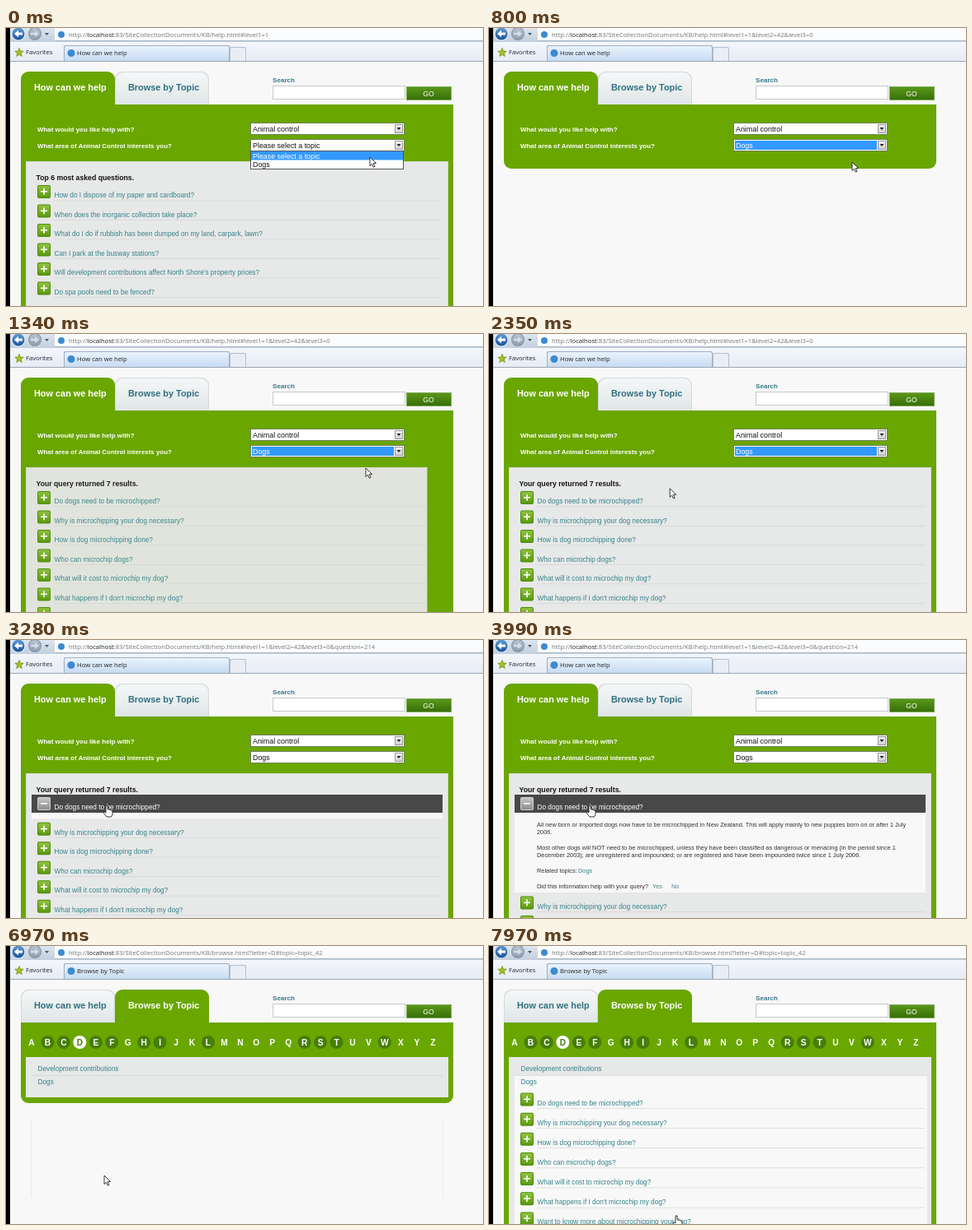
These frames come from a looping animation (578 px wide and 338 px high, 8000 ms). An HTML page with a canvas:

```html
<!DOCTYPE html>
<html lang="en">
<head>
<meta charset="utf-8">
<title>Help page walkthrough</title>
<style>
  html, body { margin: 0; width: 100%; height: 100%; overflow: hidden; background: #f8f8f8; }
  canvas { display: block; width: 578px; height: 338px; }
</style>
</head>
<body>
<canvas id="stage" width="578" height="338"></canvas>
<script>
const ctx = document.getElementById('stage').getContext('2d');
const LOOP = 8000;
const ARIAL = '"Liberation Sans", Arial, sans-serif';
const CHROME = '"Open Sans", "Noto Sans", sans-serif';
const GREEN = '#6aa600', TEAL = '#35838a', GREY = '#e7e8e8';

const TIME = { pick: 230, choose: 420, ask: 3060, browse: 5720, letter: 6320, topic: 6720 };

const POPULAR = [
  'How do I dispose of my paper and cardboard?',
  'When does the inorganic collection take place?',
  'What do I do if rubbish has been dumped on my land, carpark, lawn?',
  'Can I park at the busway stations?',
  "Will development contributions affect North Shore's property prices?",
  'Do spa pools need to be fenced?'
];
const DOG_QUESTIONS = [
  'Do dogs need to be microchipped?',
  'Why is microchipping your dog necessary?',
  'How is dog microchipping done?',
  'Who can microchip dogs?',
  'What will it cost to microchip my dog?',
  "What happens if I don't microchip my dog?",
  'Want to know more about microchipping your dog?'
];
const ANSWER = [
  [227, 'All new born or imported dogs now have to be microchipped in New Zealand. This will apply mainly to new puppies born on or after 1 July'],
  [236, '2006.'],
  [255, 'Most other dogs will NOT need to be microchipped, unless they have been classified as dangerous or menacing (in the period since 1'],
  [264, 'December 2003); are unregistered and impounded; or are registered and have been impounded twice since 1 July 2006.'],
  [283, 'Related topics:'],
  [302, 'Did this information help with your query?']
];

// Pointer path: time, x, y
const POINTER = [
  [0, 441, 157], [70, 441, 157], [260, 441, 166], [420, 441, 165], [800, 440, 163],
  [1340, 436, 163], [2180, 240, 185], [2800, 122, 201], [4430, 122, 201], [4950, 153, 282],
  [5420, 153, 282], [5660, 194, 72], [5900, 194, 72], [6270, 90, 117], [6380, 90, 117],
  [6640, 48, 164], [6740, 48, 164], [6960, 119, 279], [7080, 119, 279], [7820, 227, 328], [8000, 227, 328]
];
const HAND_TIMES = [[2450, 4480], [5630, 5960], [6230, 6430], [6600, 6770], [7400, 8000]];

const swing = p => 0.5 - Math.cos(Math.PI * p) / 2;
const progress = (t, start, length) => swing(Math.min(1, Math.max(0, (t - start) / length)));

function text(str, x, y, size, color, bold, family = ARIAL) {
  ctx.font = `${bold ? 'bold ' : ''}${size}px ${family}`;
  ctx.fillStyle = color;
  ctx.fillText(str, x, y);
  return x + ctx.measureText(str).width;
}

function centered(...args) {
  ctx.textAlign = 'center';
  text(...args);
  ctx.textAlign = 'left';
}

function rect(x, y, w, h, fill) {
  ctx.fillStyle = fill;
  ctx.fillRect(x, y, w, h);
}

function frame(x, y, w, h, color) {
  ctx.strokeStyle = color;
  ctx.lineWidth = 1;
  ctx.strokeRect(x + 0.5, y + 0.5, w - 1, h - 1);
}

function rounded(x, y, w, h, radii, fill) {
  ctx.beginPath();
  ctx.roundRect(x, y, w, h, radii);
  ctx.fillStyle = fill;
  ctx.fill();
}

function circle(x, y, r, fill) {
  ctx.beginPath();
  ctx.arc(x, y, r, 0, Math.PI * 2);
  ctx.fillStyle = fill;
  ctx.fill();
}

function shape(points, fill, stroke) {
  ctx.beginPath();
  points.forEach(([x, y]) => ctx.lineTo(x, y));
  ctx.closePath();
  ctx.fillStyle = fill;
  ctx.fill();
  if (stroke) {
    ctx.strokeStyle = stroke;
    ctx.lineWidth = 0.9;
    ctx.stroke();
  }
}

function shade(y, h, top, bottom) {
  const g = ctx.createLinearGradient(0, y, 0, y + h);
  g.addColorStop(0, top);
  g.addColorStop(1, bottom);
  return g;
}

function clipped(x, y, w, h, draw) {
  ctx.save();
  ctx.beginPath();
  ctx.rect(x, y, w, h);
  ctx.clip();
  draw();
  ctx.restore();
}

function pageAddress(t) {
  if (t >= TIME.browse) {
    return 'browse.html' + (t >= TIME.letter ? '?letter=D' : '') + (t >= TIME.topic ? '#topic=topic_42' : '');
  }
  return 'help.html#level1=1' + (t >= 570 ? '&level2=42&level3=0' : '') + (t >= TIME.ask ? '&question=214' : '');
}

function drawBrowser(t) {
  rect(0, 0, 578, 17, shade(0, 17, '#dde5ee', '#c3cfdd'));
  rect(59, 0, 519, 15, '#fbfcfd');
  rect(59, 15, 519, 1, '#a9b6c4');
  rect(0, 17, 578, 24, shade(17, 24, '#f3f6fb', '#e6ecf5'));
  rect(0, 40, 578, 1, '#9aa6b4');

  circle(15, 7, 8.5, '#e6edf5');
  circle(15, 7, 7.5, shade(0, 15, '#5e9ad3', '#154f96'));
  shape([[10, 7], [15, 2.5], [15, 5.5], [20, 5.5], [20, 8.5], [15, 8.5], [15, 11.5]], '#fff');
  circle(35, 7, 8, '#8493a5');
  circle(35, 7, 7, shade(0, 14, '#b8c4d2', '#8d9db0'));
  shape([[40, 7], [35, 3], [35, 5.7], [30, 5.7], [30, 8.3], [35, 8.3], [35, 11]], '#d5dde6');
  shape([[47, 6], [52, 6], [49.5, 9]], '#47586d');

  circle(67, 8, 4, '#3d8ad0');
  let x = text('http://', 76, 10.5, 7.7, '#777', false, CHROME);
  x = text('localhost', x, 10.5, 7.7, '#222', false, CHROME);
  text(':83/SiteCollectionDocuments/KB/' + pageAddress(t), x, 10.5, 7.7, '#777', false, CHROME);

  const star = Array.from({ length: 10 }, (_, i) => {
    const r = i % 2 ? 2.4 : 5.5, a = i * Math.PI / 5;
    return [16 + r * Math.sin(a), 30 - r * Math.cos(a)];
  });
  shape(star, '#a8bf22', '#7c9a1c');
  text('Favorites', 24, 32.3, 7.7, '#223', false, CHROME);

  rounded(70, 21, 201, 19, [2, 2, 0, 0], '#9dafc4');
  rounded(71, 22, 199, 18, [2, 2, 0, 0], shade(22, 18, '#eaf3fd', '#c7dbf1'));
  rounded(271, 23, 20, 17, [2, 2, 0, 0], '#b4c0ce');
  rounded(272, 24, 18, 16, [2, 2, 0, 0], '#e9eef6');
  circle(79, 30.5, 4.5, '#3d8ad0');
  text(t < TIME.browse ? 'How can we help' : 'Browse by Topic', 86, 33.3, 7.7, '#222', false, CHROME);
}

function drawTab(label, x, w, textX, active) {
  const round = [9, 9, 0, 0];
  if (active) {
    rounded(x, 53, w, 42, round, GREEN);
  } else {
    rounded(x, 53, w, 40, round, '#d3dadd');
    rounded(x + 1, 54, w - 2, 39, round, shade(54, 39, '#f5f7f7', '#dfe6e8'));
  }
  text(label, textX, 76.3, 10.9, active ? '#fff' : '#2f7080', true);
}

function drawHeader(onBrowse, panelBottom) {
  drawTab('How can we help', 18, 114, 34, !onBrowse);
  drawTab('Browse by Topic', 132, 114, 148, onBrowse);
  rounded(18, 93, 524, panelBottom - 93, [0, 0, 9, 9], GREEN);

  text('Search', 323, 66, 8.1, '#35788a', true);
  rect(323, 70, 161, 17, '#fff');
  frame(323, 70, 161, 17, '#c5c9cc');
  rect(485, 71, 55, 17, shade(71, 17, '#5d9a1a', '#356c08'));
  frame(485, 71, 55, 17, '#7fa958');
  centered('GO', 512, 82.5, 8.6, '#fff');
}

function drawSelect(y, value, focused) {
  rect(296, y, 187, 15, '#fff');
  frame(296, y, 187, 15, '#6f8060');
  if (focused) rect(298, y + 2, 172, 11, '#3399ff');
  text(value, 299, y + 11, 8.9, focused ? '#fff' : '#111');
  rect(471, y + 2, 10, 11, shade(y + 2, 11, '#f4f4f4', '#cfcfcf'));
  frame(471, y + 2, 10, 11, '#999');
  shape([[473.5, y + 6], [478.5, y + 6], [476, y + 9]], '#222');
}

function drawDropdown(t) {
  rect(296, 149, 186, 23, '#fff');
  frame(296, 149, 186, 23, '#555');
  const picked = t >= TIME.pick ? 1 : 0;
  rect(297, 150 + picked * 11, 184, 10.5, '#3399ff');
  ['Please select a topic', 'Dogs'].forEach((label, i) =>
    text(label, 299, 158.5 + i * 10.8, 8.9, i === picked ? '#fff' : '#111'));
}

function drawIcon(y, open) {
  rounded(38, y - 8, 16, 16, 2, open ? '#d0d0d0' : '#4f8a08');
  rounded(39, y - 7, 14, 14, 1, open ? shade(y - 7, 14, '#c4c4c4', '#8f8f8f') : shade(y - 7, 14, '#8fc23f', '#5c990f'));
  rect(42, y - 1, 8, 1.6, '#fff');
  if (!open) rect(45.2, y - 4.2, 1.6, 8, '#fff');
}

function drawQuestion(label, y) {
  drawIcon(y - 4, false);
  text(label, 58.5, y + 3, 8.28, TEAL);
  rect(58, y + 6.5, 470, 0.7, '#d3d6d6');
}

function drawAnswer(height) {
  rect(31, 188, 498, 22, '#484848');
  drawIcon(199, true);
  text(DOG_QUESTIONS[0], 58.5, 206, 8.28, '#fff');
  clipped(31, 210, 498, height, () => {
    rect(31, 210, 498, 100, '#f8f8f8');
    ANSWER.forEach(([y, line]) => text(line, 58, y, 7.36, '#333'));
    text('Dogs', 108, 283, 7.36, TEAL);
    text('Yes', 198, 302, 7.36, '#4c7f86');
    text('No', 221, 302, 7.36, '#4c7f86');
  });
}

function drawResults(t, shown) {
  const popular = t < 800;
  const opened = progress(t, 3175, 600) * 97;
  ctx.globalAlpha = shown;
  clipped(24, 162, 512 * shown, 220 * shown, () => {
    rect(24, 162, 512, 220, GREY);
    frame(24, 162, 512, 220, '#d5dcca');
    text(popular ? 'Top 6 most asked questions.' : 'Your query returned 7 results.', 36.5, 185, 8.7, '#111', true);
    const asked = t >= TIME.ask;
    (popular ? POPULAR : DOG_QUESTIONS).forEach((label, i) => {
      if (!asked || i) drawQuestion(label, 203 + i * 23.5 + opened);
    });
    if (asked) drawAnswer(opened);
  });
  ctx.globalAlpha = 1;
}

function drawHelp(t) {
  const shown = t < 800 ? 1 - progress(t, 500, 260) : progress(t, 870, 550);
  drawHeader(false, 171 + 220 * shown);
  text('What would you like help with?', 38, 125.5, 7.93, '#fff', true);
  text('What area of Animal Control interests you?', 38, 145.5, 7.93, '#fff', true);
  if (shown > 0) drawResults(t, shown);
  const chosen = t >= TIME.choose;
  drawSelect(115, 'Animal control', false);
  drawSelect(135, chosen ? 'Dogs' : 'Please select a topic', chosen && t < TIME.ask);
  if (!chosen) drawDropdown(t);
}

function drawLetters(t) {
  [...'ABCDEFGHIJKLMNOPQRSTUVWXYZ'].forEach((letter, i) => {
    const x = 31 + i * 19.45;
    const selected = letter === 'D' && t >= TIME.letter;
    if ('BCDEFHILRSTW'.includes(letter)) circle(x, 117, 8, selected ? '#fff' : '#477d0a');
    centered(letter, x, 121, 10.2, selected ? '#477d0a' : '#fff', true);
  });
}

function drawBrowse(t) {
  const list = progress(t, TIME.letter + 30, 260) * 49;
  const opened = progress(t, 7050, 600) * 178;
  drawHeader(true, 142 + list + opened);
  drawLetters(t);
  clipped(24, 135, 512, list + opened, () => {
    rect(24, 135, 512, 230, GREY);
    if (opened) rect(31, 157, 500, 14 + opened, '#f8f8f8');
    text('Development contributions', 38.5, 152, 8.28, TEAL);
    rect(31, 157, 500, 0.7, '#d3d6d6');
    text('Dogs', 38.5, 168, 8.28, TEAL);
    if (opened) clipped(31, 172, 500, opened, () =>
      DOG_QUESTIONS.forEach((label, i) => drawQuestion(label, 190.5 + i * 24.15)));
  });
  if (t >= TIME.topic && t < 7050) {
    rect(30, 210, 1, 96, '#ebecec');
    rect(529, 210, 1, 96, '#ebecec');
  }
}

function drawPointer(t) {
  const next = Math.max(1, POINTER.findIndex(p => p[0] > t));
  const [t0, x0, y0] = POINTER[next - 1], [t1, x1, y1] = POINTER[next];
  const p = swing((t - t0) / (t1 - t0));
  const hand = HAND_TIMES.some(([from, to]) => t >= from && t < to);
  ctx.save();
  ctx.translate(x0 + (x1 - x0) * p, y0 + (y1 - y0) * p);
  shape(hand
    ? [[-1, 0], [1, 0], [1.3, 5], [5, 5.4], [7, 7], [7, 11], [5.5, 14], [0, 14], [-4, 9], [-3.5, 7.5], [-1, 9]]
    : [[0, 0], [0, 10.5], [2.5, 8.3], [4.3, 12.2], [6, 11.4], [4.2, 7.6], [7.5, 7.5]], '#fff', '#222');
  ctx.restore();
}

function draw(now) {
  const t = now % LOOP;
  rect(0, 0, 578, 338, '#f8f8f8');
  drawBrowser(t);
  (t < TIME.browse ? drawHelp : drawBrowse)(t);
  rect(0, 0, 5, 338, '#000');
  drawPointer(t);
  requestAnimationFrame(draw);
}
requestAnimationFrame(draw);
</script>
</body>
</html>
```
